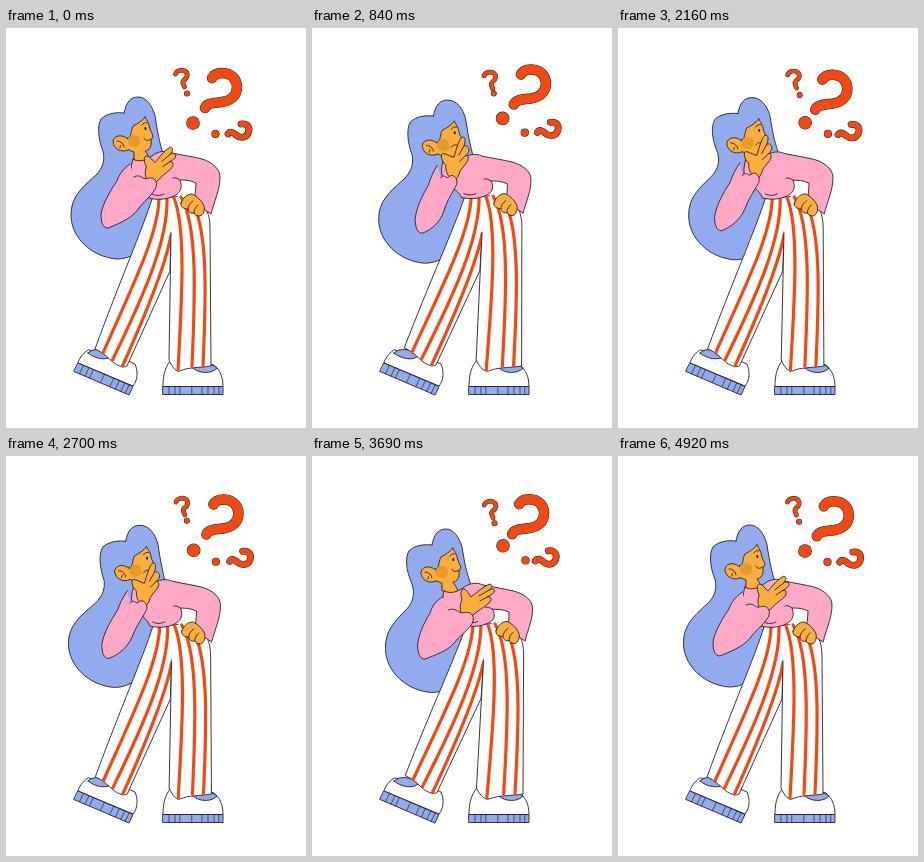
An HTML page for the animation above (4.95 s loop, 300 by 400 pixels).

```html
<!DOCTYPE html>
<html lang="en">
<head>
<meta charset="utf-8">
<title>Thinking</title>
<style>
  html, body { margin: 0; width: 100%; height: 100%; overflow: hidden; background: #fff; }
  svg { display: block; width: 100vw; height: 100vh; }
</style>
</head>
<body>
<svg id="stage" viewBox="0 0 300 400" fill="none" stroke-linecap="round" stroke-linejoin="round"></svg>
<script>
const LOOP = 4950, SWAY = LOOP / 2;
const INK = '#24212b', HAIR = '#92abef', SKIN = '#fbae3c', PINK = '#ffa9c6', RED = '#f04a12', WHITE = '#fff';
const stage = document.getElementById('stage');

const clamp = v => Math.max(0, Math.min(1, v));
const ramp = (v, from, to) => clamp((v - from) / (to - from));
const ease = k => k * k * (3 - 2 * k);
const PAIR = /(-?[\d.]+),(-?[\d.]+)/g;

function warp(d, move) {
  return d.replace(PAIR, (_, a, b) => {
    const [dx, dy] = move(+a, +b);
    return (+a + dx).toFixed(2) + ',' + (+b + dy).toFixed(2);
  });
}

function blend(from, to, k) {
  const ends = [...to.matchAll(PAIR)];
  let i = 0;
  return from.replace(PAIR, (_, a, b) => {
    const end = ends[i++];
    return (+a + (end[1] - a) * k).toFixed(2) + ',' + (+b + (end[2] - b) * k).toFixed(2);
  });
}

const parts = [];
function part(d, fill, move, stroke = INK, width = 0.9) {
  const node = document.createElementNS('http://www.w3.org/2000/svg', 'path');
  for (const [key, value] of Object.entries({ d: typeof d === 'string' ? d : '', fill, stroke, 'stroke-width': width }))
    node.setAttribute(key, value);
  stage.append(node);
  if (move) parts.push({ node, d, move });
}

// Pose: s = sway of the body, g = how far the hand is opened, p = sway phase.
let s = 0, g = 0, p = 0;
const wave = lag => Math.cos(2 * Math.PI * (p - lag));

const headMove = () => [2.5 * s + (0.7 - g) * 2, 3.7 * s + (0.7 - g) * 2];
const hairMove = (x, y) => {
  const w = ease(ramp(y, 105, 180));
  const turn = x > 138 && y < 130 ? (0.7 - g) * 2 : 0;
  const swing = 7.5 * wave(0.65) + 5.4;
  return [headMove()[0] * (1 - w) + swing * w + turn, (4 + 1.5 * w) * s];
};
const torsoMove = (x, y) => {
  const w = ramp(y, 130, 170);
  return [s * (5 + 3 * w), s * (4 - 5 * w)];
};
const armMove = (x, y) => {
  const low = ramp(y, 130, 190), cuff = ramp(x, 115, 145);
  return [
    s * (5 + 6 * low * (1 - cuff) + cuff) + (g - 0.7) * 15 * cuff,
    s * 4 + (0.7 - g) * 3 * low * (1 - cuff) + (g - 0.7) * 8 * cuff
  ];
};
const handMove = () => [5 * s + 1 - 3 * g, 3 * s];
const hipMove = () => [9 * s, -0.5 * s];
const legMove = (x, y) => {
  const w = ramp(y, 170, 330), left = x < 140;
  const hem = left ? 4 : 1.5 + 4.5 * ramp(x, 165, 188);
  return [s * (8 + (hem - 8) * w), -s * (1 - w) - (left ? 1.5 * s * w : 0)];
};

// Hair and head
part('M118,85 C120,74 125,69 132,69 C140,69 146,77 149,88 C151,102 153,112 156,123 L160,150 L140,212 C134,225 122,231 110,231 C84,229 64,209 64,187 C64,169 75,160 86,150 C95,143 99,134 97,124 C92,111 91,98 95,91 C101,85 111,84 118,85Z', HAIR, hairMove);
part('M139,89 C141,93 143,95 143.5,99 C144,103 147,106 147,109 C146,111 145,111 145,113 C146,118 143,123 139,123 C141,125 142,128 144,131 C139,137 131,136 128,131 L128,124 C125,123 123,122 121,121 L121,110 C126,109 124,104 127,98 C131,96 136,93 139,89Z', SKIN, headMove);
part('M122,111 C115,105 107,108 107,114 C108,121 115,125 122,122', SKIN, headMove);
part('M111,113 C115,113 118,116 118,119 M115,117 C114,118 114,119 114,120', 'none', headMove);
part('M122,113 C122,105 134,105 134,113 C134,121 122,121 122,113Z', '#e59a2e', headMove, 'none');
part('M136,97 C137,95 139,94 141,95', 'none', headMove);
part('M139.4,100 L139.5,101', 'none', headMove, INK, 2);
const frown = 'M136,115 C138,112 141,112 143,114', smile = 'M138,110 C139,113 142,113 145,111';
part(() => blend(frown, smile, ramp(g, 0.1, 0.65)), 'none', headMove);

// Shoes: a sole runs from its top left corner along (w, h), with depth (dx, dy)
function sole(x, y, w, h, dx, dy) {
  part(`M${x},${y} l${w},${h} l${dx},${dy} l${-w},${-h}Z`, HAIR);
  const ticks = [.1, .2, .28, .48, .65, .75, .85, .93];
  part(ticks.map(k => `M${x + w * k},${y + h * k} l${dx},${dy}`).join(' '), 'none', null, INK, .7);
}
part('M82,322 C76,326 73,331 72,335 L127,358 C132,352 132,343 129,336 L122,333Z', WHITE);
sole(72, 335, 55, 23.5, -4, 8.5);
part('M82,325 C87,319 101,321 106,328 C101,333 89,331 82,325Z', HAIR);
part('M164,333 C158,341 157,350 157,358.5 L217,358.5 C217,349 214,342 208,337Z', WHITE);
sole(157, 358.5, 60, 0, 0, 8);
part('M187,340 C193,335 206,335 211,340 C206,346 193,346 187,340Z', HAIR);

// Trousers
part('M146,171 C137,200 113,255 89,321 C97,324 103,331 108,335 C112,338 118,340 121,338 L164,243 L165,205 L172,169Z', WHITE, legMove);
part('M153,171 C152,207 127,257 97,325 M161,171 C162,212 139,265 106.5,332 M165,207 C160,237 138,290 116.5,338', 'none', legMove, RED, 3.2);
part('M164,170 L165,205 L163,332 C167,341 171,344 174,343 C182,339 193,340 205,338 L204,200 C204,185 199,176 191,172 L176,166 C170,170 166,172 164,170Z', WHITE, legMove, 'none');
part('M165,205 L163,332 C167,341 171,344 174,343 C182,339 193,340 205,338 L204,200 C204,185 199,176 191,172', 'none', legMove);
part('M168,170 C180,200 176,270 172,342 M175,169 C192,198 189,270 186,338 M183,169 C203,195 200,270 197,338', 'none', legMove, RED, 3.2);

// Sweater, hips and hands
part('M127,131 C133,135 140,132 146,128 C152,123 160,122 166,125 C176,127 188,129 196,131 C206,134 214,141 214,149 C214,162 208,174 205,186 C200,183 194,178 189,176 C188,170 190,162 190,155 C184,152 178,152 174,152 C177,160 174,165 168,168 C160,172 150,172 143,170 C142,165 136,160 130,155 C124,150 124,140 127,131Z', PINK, torsoMove);
part('M174,152 C171,150 169,149 167,150 M146,166 C150,168 154,168 158,166', 'none', torsoMove);
part('M175,175 C177,170 181,166 186,166 C191,168 196,173 198,178 C199,183 197,187 194,188 C191,188 189,187 188,185 C185,186 182,184 182,181 C178,181 174,179 175,175Z', SKIN, hipMove);
part('M182,181 C182,178 184,175 187,173 M188,185 C188,181 190,179 192,177', 'none', hipMove);

const chinHand = 'M133,147 C129,143 129,139 129,135 C125,131 123,125 126,123 C131,124 135,127 137,127 C139,121 142,109 145,107 C149,106 149,110 147,116 C149,114 153,117 152,121 C151,123 150,124 149,125 C152,125 152,129 150,132 C147,136 145,138 143,141 C142,145 140,150 136,152Z';
const openHand = 'M146,154 C144,148 146,144 147,140 C145,135 146,130 149,130 C153,131 154,136 156,138 C161,134 169,127 175,125 C178,126 177,129 174,131 C177,129 181,130 179,133 C177,136 174,137 172,138 C176,137 177,140 175,143 C171,147 166,150 163,152 C160,155 156,157 151,159Z';
const chinFingers = 'M147,116 L142,125 M149,125 L143,131';
const openFingers = 'M174,131 L164,137 M172,138 L165,142';
part(() => blend(chinHand, openHand, g), SKIN, handMove);
part(() => blend(chinFingers, openFingers, g), 'none', handMove);
part('M124,136 C117,141 113,147 111,153 C104,163 97,175 95,186 C95,195 97,200 102,200 C112,196 124,191 131,183 C136,175 144,170 149,162 C153,156 150,150 145,150 C142,150 140,152 137,150 C134,148 132,147 128,149', PINK, armMove);

// Question marks: the dot trails the hook
function mark(hook, x, y, r, width, hookMove, dotMove) {
  part(hook, 'none', hookMove, INK, width + 1);
  part(hook, 'none', hookMove, RED, width);
  const dot = `M${x},${y} L${x},${y + 0.01}`;
  part(dot, 'none', dotMove, INK, 2 * r + 1);
  part(dot, 'none', dotMove, RED, 2 * r);
}
const drift = (ax, lagX, ay, lagY) => () => [
  ax * (wave(lagX) - Math.cos(2 * Math.PI * lagX)),
  ay * (wave(lagY) - Math.cos(2 * Math.PI * lagY))
];
mark('M206,50 C208,46 212,45 216,45 C226,45 231,52 231,59 C231,68 224,73 216,74 C208,75 201,75 199,80',
  187, 95, 6.3, 9.5, drift(2.6, 0.28, -2.8, 0.3), drift(2.1, 0.45, -2.7, 0.46));
mark('M235,96 C240,95 243,98 243,102 C242,110 235,111 230,107 C227,104 224,103 222,106',
  209.5, 106, 3.6, 5.8, drift(3, 0.28, -1.2, 0.32), drift(2, 0.48, -0.8, 0.45));
mark('M169.5,46 C171,42 176,41.5 179,43 C183,46 181,50 178,52 C176,54 177,56 178.5,59',
  181, 65.5, 2.5, 3.7, drift(1.4, 0.45, 1.6, 0.55), drift(1, 0.6, 2, 0.67));

function draw(time) {
  const t = time % LOOP;
  p = t / SWAY;
  s = (1 - wave(0)) / 2;
  const late = t < 1000 ? t + LOOP : t;
  g = ease(ramp(late, 2750, 3600)) - ease(ramp(late, 4650, 5450));
  for (const { node, d, move } of parts)
    node.setAttribute('d', warp(typeof d === 'function' ? d() : d, move));
}

const start = performance.now();
function tick() {
  draw(performance.now() - start);
  requestAnimationFrame(tick);
}
draw(0);
requestAnimationFrame(tick);
</script>
</body>
</html>
```
